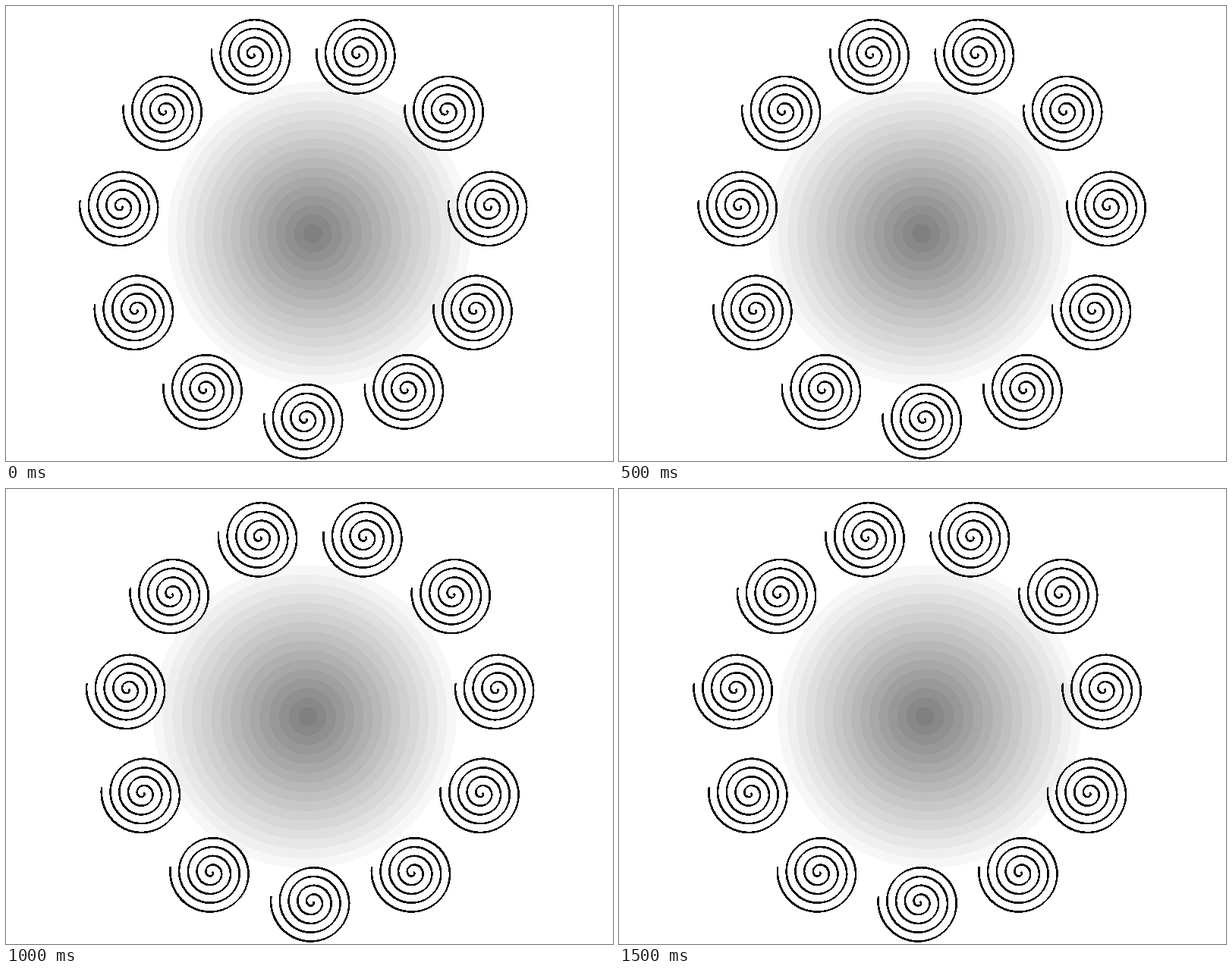
An HTML page that plays this animation: 800x600 px, repeating every 1.6 s.

```html
<!DOCTYPE html>
<html lang="en">
<head>
<meta charset="utf-8">
<title>Spirals around a cone</title>
<style>
  html, body { margin: 0; width: 100%; height: 100%; overflow: hidden; background: #fff; }
  svg { display: block; width: 100vw; height: 100vh; }
</style>
</head>
<body>
<svg viewBox="0 0 800 600" shape-rendering="crispEdges">
  <g id="discs"></g>
  <g id="ring" fill="none" stroke="#000" stroke-width="1.9"></g>
</svg>
<script>
const NS = 'http://www.w3.org/2000/svg';
const TAU = Math.PI * 2;
const STEP = 100, HALF = 8;
const DISCS = 16, SPIRALS = 11;
const ring = document.getElementById('ring');

function add(parent, tag, attrs) {
  const el = document.createElementNS(NS, tag);
  for (const key in attrs) el.setAttribute(key, attrs[key]);
  return parent.appendChild(el);
}

// Archimedean spiral, outer tip just above the left side
function spiralPath() {
  const pitch = 11.8, leftTurn = 4.62, end = 4.643;
  const points = [];
  for (let i = 0; i <= 300; i++) {
    const turn = 0.06 + (end - 0.06) * i / 300;
    const angle = TAU * (turn - leftTurn) + Math.PI;
    const r = pitch * turn;
    points.push((r * Math.cos(angle)).toFixed(2) + ' ' + (r * Math.sin(angle)).toFixed(2));
  }
  return 'M' + points.join('L');
}

// Discs from the widest and lightest to the smallest and darkest
const discs = [];
for (let i = DISCS - 1; i >= 0; i--) {
  const grey = Math.round(128 + 7.95 * i);
  const el = add(document.getElementById('discs'), 'circle', {
    cy: 300, r: 12.5 * (i + 1), fill: `rgb(${grey},${grey},${grey})`
  });
  discs.push({ el, sway: 4.2 + 8.3 * i / (DISCS - 1) });
}

const path = spiralPath();
for (let i = 0; i < SPIRALS; i++) {
  const angle = TAU * (i + 0.5) / SPIRALS;
  const x = 245.5 * Math.sin(angle), y = 299.4 - 245.5 * Math.cos(angle);
  // Two shifted strokes give a slanted pen
  for (const d of [-0.35, 0.35]) {
    add(ring, 'path', { d: path, transform: `translate(${x + d} ${y - d})` });
  }
}

function draw(ms) {
  const step = Math.floor(ms / STEP) % (2 * HALF);
  const swing = Math.abs(step - HALF) / HALF * 2 - 1; // 1 to -1 and back
  for (const { el, sway } of discs) el.setAttribute('cx', 400 + sway * swing);
  ring.setAttribute('transform', `translate(${400.6 - 6 * swing} 0)`);
}

const start = performance.now();
function tick() {
  draw(performance.now() - start);
  requestAnimationFrame(tick);
}
tick();
</script>
</body>
</html>
```
